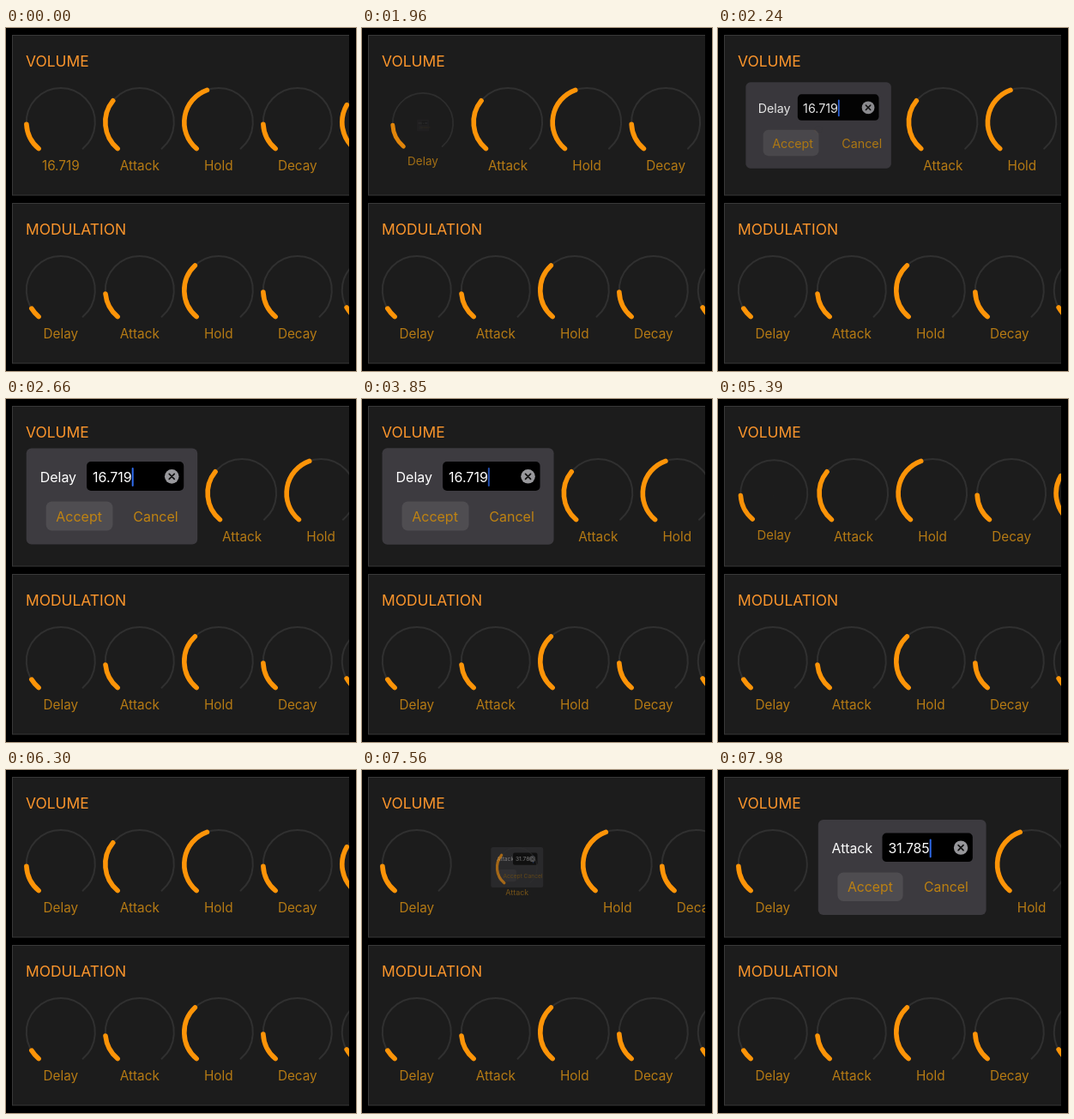
Write an HTML page that moves like this. It is 408 px wide and 400 px high and loops after 8 s.

```html
<!DOCTYPE html>
<html lang="en">
<head>
<meta charset="utf-8">
<title>Envelope knobs</title>
<style>
  html, body { margin: 0; width: 100%; height: 100%; overflow: hidden; background: #000; }
  svg { display: block; width: 408px; height: 400px; font-family: Inter, Roboto, "Liberation Sans", sans-serif; }
  .title { fill: #fb952c; font-size: 17.4px; }
  .label { fill: #b57a14; font-size: 15.3px; text-anchor: middle; }
  .edit text { font-size: 16px; }
  .white { fill: #fff; }
  .action { fill: #bf8312; text-anchor: middle; }
  .track, .arc { fill: none; stroke-linecap: round; }
  .track { stroke: #303030; stroke-width: 2; }
  .arc { stroke: #fd9408; stroke-width: 5.6; }
</style>
</head>
<body>
<svg id="stage" viewBox="0 0 408 400">
  <clipPath id="view"><rect width="400" height="400"/></clipPath>
</svg>
<script>
const LOOP = 8000, STEP = 70;
const FIRST_X = 63.8, SPACING = 92, GROW = 119.5;
const KNOB_MID = 119.5, EDIT_MID = 113.5;
const NAMES = ["Delay", "Attack", "Hold", "Decay", "Sustain"];

// Each edit: slot, shown value, start of opening, start of closing (layout, then fade).
const EDITS = [
  { slot: 0, value: "16.719", open: 1908, close: 4875, fade: 4904 },
  { slot: 1, value: "31.785", open: 7435, close: Infinity, fade: Infinity }
];

const stage = document.getElementById("stage");

function set(node, attrs) {
  for (const key in attrs) node.setAttribute(key, attrs[key]);
  return node;
}

function add(parent, tag, attrs = {}, text = "") {
  const node = document.createElementNS("http://www.w3.org/2000/svg", tag);
  node.textContent = text;
  return parent.appendChild(set(node, attrs));
}

// Angles run clockwise from straight down; the dial covers 40 to 320 degrees.
function dialPath(amount) {
  const point = deg => {
    const a = deg * Math.PI / 180;
    return `${-40 * Math.sin(a)} ${110 + 40 * Math.cos(a)}`;
  };
  const sweep = 280 * amount;
  return `M${point(40)} A40 40 0 ${sweep > 180 ? 1 : 0} 1 ${point(40 + sweep)}`;
}

function addPanel(title, top, amounts) {
  const panel = add(stage, "g", { "clip-path": "url(#view)" });
  const body = add(panel, "g", { transform: `translate(0 ${top})` });
  add(body, "rect", { x: 7.5, y: 8.5, width: 420, height: 186.5, fill: "#1c1c1c", stroke: "#393939" });
  add(body, "text", { class: "title", x: 23, y: 45 }, title);
  const knobs = amounts.map((amount, i) => {
    const group = add(body, "g", { transform: `translate(${FIRST_X + i * SPACING} 0)` });
    add(group, "path", { class: "track", d: dialPath(1) });
    add(group, "path", { class: "arc", d: dialPath(amount) });
    const label = add(group, "text", { class: "label", y: 165.6 }, NAMES[i]);
    return { group, label };
  });
  return { body, knobs };
}

const volume = addPanel("VOLUME", 0, [0.167, 0.318, 0.43, 0.167, 0.287]);
addPanel("MODULATION", 196, [0.065, 0.158, 0.345, 0.168, 0.072]);

const first = volume.knobs[0];
const reading = add(first.group, "text", { class: "label", y: 165.6 }, EDITS[0].value);

function addEditor(edit) {
  const group = add(volume.body, "g", { class: "edit" });
  volume.body.insertBefore(group, first.group);
  const ed = { group };
  ed.back = add(group, "rect", { y: -56.2, height: 112.4, rx: 6, fill: "#3d3b40" });
  ed.name = add(group, "text", { class: "white", y: -16.8 }, NAMES[edit.slot]);
  ed.field = add(group, "rect", { y: -40.5, height: 34, rx: 5, fill: "#000" });
  ed.value = add(group, "text", { class: "white", y: -16.8 }, edit.value);
  ed.caret = add(group, "rect", { y: -33.5, width: 2, height: 22, rx: 1, fill: "#2f6cf0" });
  ed.clear = add(group, "g");
  add(ed.clear, "circle", { r: 8.3, fill: "#98989c" });
  add(ed.clear, "path", { d: "M-3 -3L3 3M3 -3L-3 3", stroke: "#111", "stroke-width": 1.7, "stroke-linecap": "round" });
  ed.button = add(group, "rect", { y: 6, height: 34, rx: 7, fill: "#4f4d51" });
  ed.accept = add(group, "text", { class: "action", y: 29.3 }, "Accept");
  ed.cancel = add(group, "text", { class: "action", y: 29.3 }, "Cancel");
  return ed;
}

const editors = EDITS.map(addEditor);

const clamp = v => Math.min(1, Math.max(0, v));
const ramp = (t, from, to) => clamp((t - from) / (to - from));
const smooth = v => v * v * (3 - 2 * v);

// Critically damped spring, 0.55 s response.
function spring(ms) {
  if (ms <= 0) return 0;
  const x = ms / 1000 * 2 * Math.PI / 0.55;
  const p = 1 - (1 + x) * Math.exp(-x);
  return p > 0.9998 ? 1 : p;
}

function caretAlpha(t) {
  if (t >= 4830 && t < 7000) return 0;
  return 1 - ramp(t, 3800, 3990) + ramp(t, 4220, 4410);
}

function layEditor(ed, edit, p, t) {
  const q = 1 - p;
  const half = (107 + 93 * p) / 2;
  const midX = FIRST_X + edit.slot * SPACING + GROW / 2 * p;
  set(ed.group, {
    transform: `translate(${midX} ${EDIT_MID}) scale(${p})`,
    opacity: p,
    visibility: p > 0.005 ? "visible" : "hidden"
  });
  const left = 16 - half, right = half - 16;
  const fieldX = left + ed.name.getComputedTextLength() + 12 - 25 * q;
  const valueX = fieldX + 7;
  const buttonHalf = 39 - 24 * q;
  set(ed.back, { x: -half, width: half * 2 });
  set(ed.name, { x: left });
  set(ed.field, { x: fieldX, width: Math.max(0, right - fieldX) });
  set(ed.value, { x: valueX });
  set(ed.caret, { x: valueX + ed.value.getComputedTextLength(), opacity: caretAlpha(t) });
  set(ed.clear, { transform: `translate(${right - 14} -23.2)` });
  set(ed.button, { x: -38 + 19 * q - buttonHalf, width: buttonHalf * 2 });
  set(ed.accept, { x: -38.5 + 45 * q });
  set(ed.cancel, { x: 51 + Math.max(-6, 72 * q * (1 - 2.4 * q)) });
}

function draw(time) {
  const t = Math.floor(time % LOOP / STEP) * STEP;
  const states = EDITS.map(e => ({
    room: spring(t - e.open) - spring(t - e.close),
    shown: spring(t - e.open) - spring(t - e.fade)
  }));

  volume.knobs.forEach(({ group }, i) => {
    let x = FIRST_X + i * SPACING, scale = 1;
    EDITS.forEach((e, n) => {
      if (i > e.slot) x += GROW * states[n].room;
      if (i === e.slot) {
        x += GROW / 2 * states[n].shown;
        scale -= states[n].shown;
      }
    });
    set(group, {
      transform: `translate(${x} ${KNOB_MID}) scale(${scale}) translate(0 ${-KNOB_MID})`,
      opacity: scale,
      visibility: scale > 0.005 ? "visible" : "hidden"
    });
  });

  editors.forEach((ed, n) => layEditor(ed, EDITS[n], states[n].shown, t));

  const named = smooth(ramp(t, 650, 1060));
  set(first.label, { opacity: named });
  set(reading, { opacity: 1 - named });
}

const begin = performance.now();
function tick() {
  draw(performance.now() - begin);
  requestAnimationFrame(tick);
}
tick();
</script>
</body>
</html>
```
